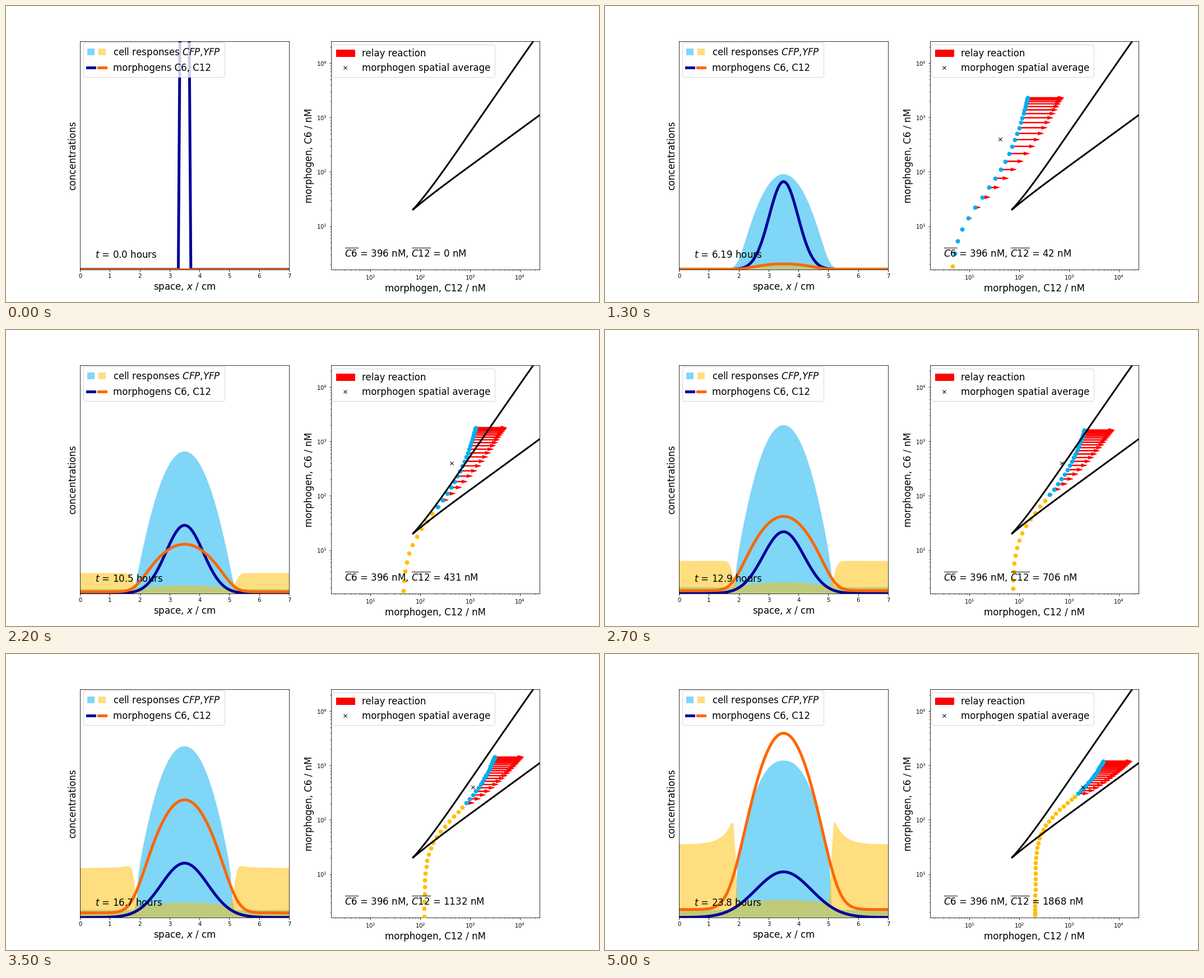
Animation of 1058 by 529 pixels, one loop 5100 ms. Source, as a matplotlib script:

```python
import numpy as np
import matplotlib.pyplot as plt
from matplotlib.animation import FuncAnimation
from matplotlib.legend_handler import HandlerTuple
from matplotlib.lines import Line2D
from matplotlib.patches import Patch

FRAMES, INTERVAL = 51, 100
HOURS_PER_FRAME = 10 / 21
DX, DIFFUSION, SUBSTEPS = 0.07, 0.018, 10
TOP = 6000                   # upper limit of the concentration axis
UNIT = TOP / 407.3           # concentration per pixel
LOW, HIGH = 1.6, 25000
CYAN, GOLD, NAVY, ORANGE = "#00aeef", "#ffbf00", "#000099", "#ff6600"
FONT = 16.67

x = np.linspace(0, 7, 101)
r = np.abs(x - 3.5)


def softplus(v):
    return np.logaddexp(0, v)


def step(v):
    return 1 / (1 + np.exp(-np.clip(v, -50, 50)))


def dome(softness, u):
    """Equals u where u is large and fades smoothly to zero below."""
    return softplus(softness * u) / softplus(softness)


def diffuse():
    """First morphogen: a narrow block spreading between closed walls."""
    c = np.where(r < 2.5 * DX, 8000.0, 0.0)
    rate = DIFFUSION * HOURS_PER_FRAME / SUBSTEPS / DX ** 2
    history = [c]
    for _ in range(FRAMES - 1):
        for _ in range(SUBSTEPS):
            walls = np.pad(c, 1, mode="edge")
            c = c + rate * (walls[2:] - 2 * c + walls[:-2])
        history.append(c)
    return history


c6 = diffuse()
C6_MEAN = c6[0].mean()


def grown(t):
    """Effective production time: exponential growth, then steady."""
    return 0.92 * softplus((t - 6.943) / 0.92) * np.tanh(t)


def switch(t):
    """Distance from the centre where cells change their response."""
    return 1.575 + 0.75 * np.exp(-t / 4.5)


def c12_mean(t):
    s = grown(t)
    return s * (124 - 0.785 * s)


def c12_profile(t):
    peak = c12_mean(t) * (2.27 + 7.8 / (t + 0.05))
    edge = 12.35 * grown(t)
    softness = 6.05 * np.exp(-t / 35) * (0.4 + 0.6 * step((t - 4.9) / 0.6))
    width = 0.05 + 2.6 * (1 - np.exp(-0.028 * t ** 2))
    return edge + (peak - edge) * dome(softness, 1 - r ** 2 / width)


def cfp_shape(t):
    radius = 0.1 + 1.43 * (1 - np.exp(-t / 2.4)) + 0.014 * t
    power = 2 + 0.3 * (t / 24) ** 4
    gate = step((switch(t) - r) / (0.015 + 0.5 * np.exp(-t / 4)))
    return dome(3 + 0.6 * t, 1 - (r / radius) ** power) * gate


def cfp_profile(t):
    rise = 182 * (1 - np.exp(-t / 2)) + 200 * step((t - 10.2) / 1.4) * np.tanh(t)
    peak = rise * np.exp(-0.013 * t)
    edge = 13.5 * step((t - 9.9) / 1.9) * np.tanh(t)
    return edge + (peak - edge) * cfp_shape(t)


def yfp_profile(t):
    s = grown(t)
    centre = 32 * step((t - 11.2) / 3.5) * np.tanh(t)
    side = 0.9 * (1 - np.exp(-t / 10))
    inner = centre * (side + (1 - side) * np.clip(1 - (r / 1.6) ** 2, 0, 1))
    bump = 5.5 * softplus(t - 15.8) * np.exp(-np.maximum(r - 1.7, 0) / 0.32)
    outer = s * (10.95 - 0.19 * s) + bump
    gate = step((r - 1.84 + 0.01 * t) / (0.09 - 0.0028 * t))
    return inner + (outer - inner) * gate


fig, (left, right) = plt.subplots(1, 2, figsize=(1058.02 / 72, 529.02 / 72), dpi=72)

# Left panel: profiles in space
left.set(xlim=(0, 7), ylim=(0, TOP), yticks=[])
left.set_xlabel("space, $x$ / cm", fontsize=FONT)
left.set_ylabel("concentrations", fontsize=FONT)


def area(color):
    return left.fill([0, 7, 7], [0, 0, 0], color=color, alpha=0.5, lw=0)[0]


cfp_area, yfp_area = area(CYAN), area(GOLD)
c6_line, = left.plot([], [], color=NAVY, lw=5)
c12_line, = left.plot([], [], color=ORANGE, lw=5)
clock = left.text(0.5, 310, "", fontsize=FONT)
left.legend([(cfp_area, yfp_area), (c6_line, c12_line)],
            ["cell responses $CFP$,$YFP$", "morphogens C6, C12"],
            handler_map={tuple: HandlerTuple(ndivide=None)},
            fontsize=FONT, loc=(0.015, 0.845))

# Right panel: phase plane
right.set(xscale="log", yscale="log")
right.set_xlabel("morphogen, C12 / nM", fontsize=FONT)
right.set_ylabel("morphogen, C6 / nM", fontsize=FONT)
arrows = right.quiver(np.ones_like(x), np.ones_like(x), np.ones_like(x), np.zeros_like(x),
                      color="red", scale=1, scale_units="dots", zorder=2)


def dots(color):
    return right.plot([], [], "o", color=color, ms=6, mew=1.5, zorder=3)[0]


gold_dots, cyan_dots = dots(GOLD), dots(CYAN)

# Two branches of the bistable region leave a common tip, in decades
d = np.linspace(0, 2.7, 120)
upper = d * (1.29 - 0.3 * np.exp(-d / 0.65))
lower = d * (0.68 + 0.09 * np.exp(-d / 0.8))
right.plot(71 * 10 ** np.r_[d[::-1], d], 20.1 * 10 ** np.r_[upper[::-1], lower],
           color="black", lw=3, zorder=4)
cross, = right.plot([], [], "x", color="black", zorder=5)
averages = right.text(3, 2.7, "", fontsize=FONT, zorder=6)
right.set(xlim=(LOW, HIGH), ylim=(LOW, HIGH))
right.legend([Patch(color="red"), Line2D([], [], color="black", marker="x", ls="")],
             ["relay reaction", "morphogen spatial average"],
             fontsize=FONT, loc=(0.007, 0.845)).set_zorder(7)


def set_area(patch, height):
    patch.set_xy(np.column_stack([np.r_[0, x, 7], np.r_[0, height * UNIT, 0]]))


def update(n):
    t = n * HOURS_PER_FRAME
    mean, c12 = c12_mean(t), c12_profile(t)
    set_area(cfp_area, cfp_profile(t))
    set_area(yfp_area, yfp_profile(t))
    c6_line.set_data(x, c6[n])
    c12_line.set_data(x, c12)
    clock.set_text(f"$t$ = {t:.3} hours")

    across, level = np.maximum(c12, 1e-6), np.maximum(c6[n], 1e-6)
    relay = r < switch(t)
    reach = (52 + 69 * np.exp(-0.266 * t)) * cfp_shape(t) ** 0.85
    arrows.set_offsets(np.column_stack([across, level]))
    arrows.set_UVC(np.where(relay, reach, 0), np.zeros_like(x))
    cyan_dots.set_data(across[relay], level[relay])
    gold_dots.set_data(across[~relay], level[~relay])
    cross.set_data([max(mean, 1e-6)], [C6_MEAN])
    averages.set_text(rf"$\overline{{C6}}$ = {C6_MEAN:.0f} nM, "
                      rf"$\overline{{C12}}$ = {mean:.0f} nM")
    return []


anim = FuncAnimation(fig, update, frames=FRAMES, interval=INTERVAL,
                     init_func=lambda: update(0), repeat=True, repeat_delay=0)
plt.show()
```
